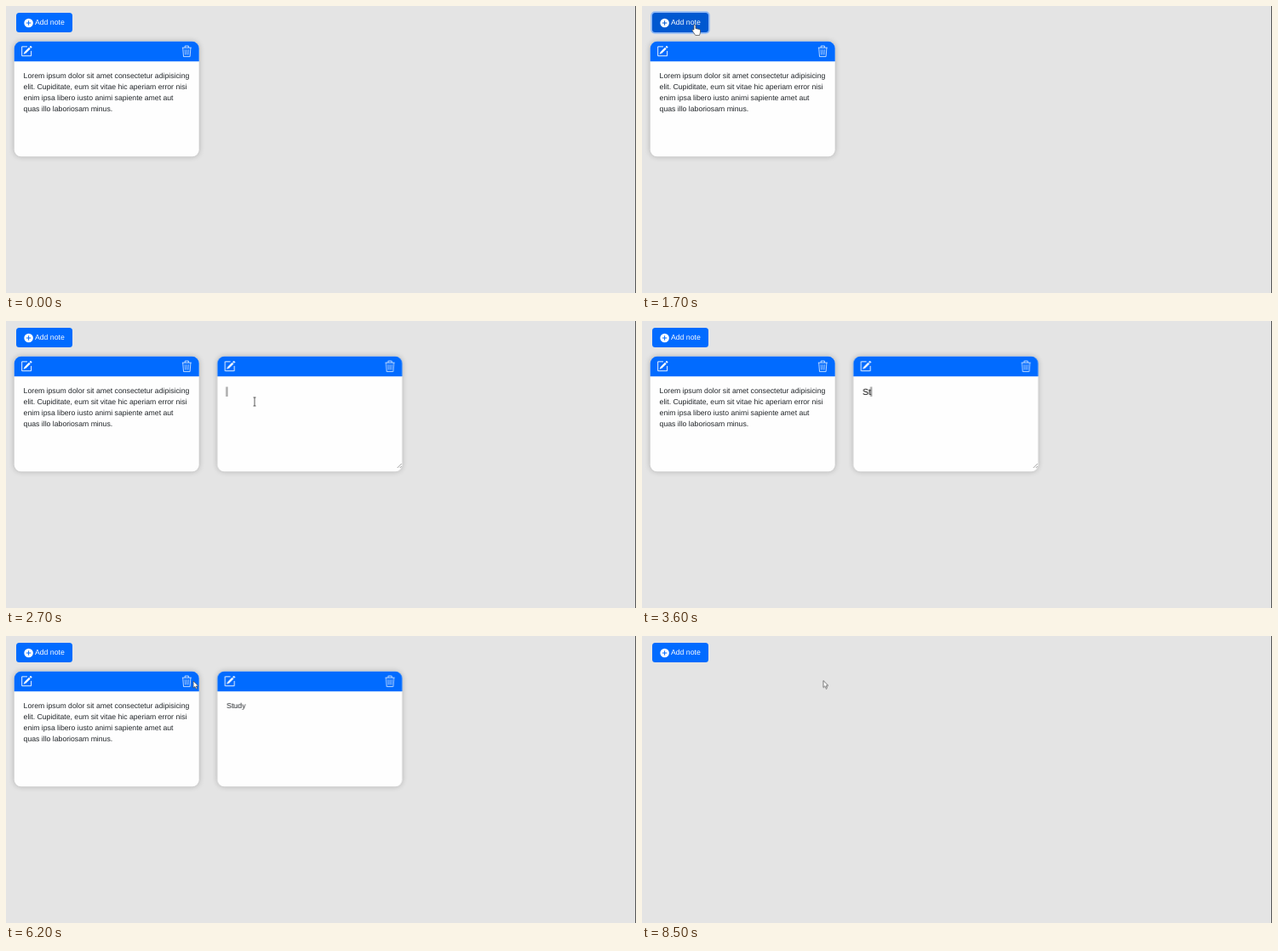
An HTML page for the animation above (9.1 s loop, 740 by 338 pixels).

```html
<!DOCTYPE html>
<html lang="en">
<head>
<meta charset="utf-8">
<title>Notes</title>
<style>
  html, body { margin: 0; width: 100%; height: 100%; overflow: hidden; background: #e4e4e4; }
  svg { display: block; }
  text { font: 8.68px "Liberation Sans", Arial, sans-serif; fill: #212529; text-rendering: geometricPrecision; }
  #label { fill: #fff; }
  #typed { font-size: 10.4px; fill: #000; }
  .icon { fill: none; stroke: #fff; stroke-linejoin: round; }
  .shadow { filter: drop-shadow(0 0 3px rgba(0, 0, 0, .24)); }
  .pointer { fill: #fff; stroke: #444; stroke-width: .7; stroke-linejoin: round; }
</style>
</head>
<body>
<svg width="740" height="338" viewBox="0 0 740 338">
  <defs>
    <g id="card">
      <rect class="shadow" x="9.7" y="41.8" width="217" height="135.5" rx="8" fill="#fefefe"/>
      <path d="M9.7 65.2V49.8a8 8 0 0 1 8-8h201a8 8 0 0 1 8 8v15.4z" fill="#016bff"/>
      <g class="icon" transform="translate(17.4 46.6) scale(.84)">
        <path d="M9 1.5H1.5v13h13v-7" stroke-width="1.1"/>
        <path d="M5.7 10.3L12.4 3.6M13.1 2.9L14.8 1.2" stroke-width="2.8"/>
        <path d="M3.8 12.2l1-2.8 1.8 1.8z" fill="#fff" stroke="none"/>
      </g>
      <g class="icon" transform="translate(205.6 46.6) scale(.84)" opacity=".88">
        <path d="M1.5 3h13M5.5 3V.5h5V3M2.5 3l1 12.5h9L13.5 3"/>
        <path d="M5.5 5.5l.4 7.5M8 5.5V13M10.5 5.5l-.4 7.5" stroke-width=".8"/>
      </g>
    </g>
  </defs>

  <rect width="740" height="338" fill="#e4e4e4"/>
  <rect x="739" width="1" height="338" fill="#555"/>

  <rect id="ring" x="10.2" y="6.2" width="69.6" height="26.6" rx="5" fill="#8fb8f4"/>
  <rect id="button" x="12" y="8" width="66" height="23" rx="3.5" fill="#016bff"/>
  <circle cx="26.6" cy="20" r="5.3" fill="#fff"/>
  <path id="plus" d="M23.9 20h5.4M26.6 17.3v5.4" stroke="#016bff"/>
  <text id="label" x="34" y="22.4">Add note</text>

  <g id="first">
    <use href="#card"/>
    <text y="72.3">
      <tspan x="20.6" dy="13">Lorem ipsum dolor sit amet consectetur adipisicing</tspan>
      <tspan x="20.6" dy="13">elit. Cupiditate, eum sit vitae hic aperiam error nisi</tspan>
      <tspan x="20.6" dy="13">enim ipsa libero iusto animi sapiente amet aut</tspan>
      <tspan x="20.6" dy="13">quas illo laboriosam minus.</tspan>
    </text>
  </g>

  <g id="second">
    <use href="#card"/>
    <g id="editor">
      <path d="M221 173l5-5M224 173l2-2" stroke="#777" stroke-width=".7"/>
      <text id="typed" x="20.6" y="87"></text>
      <rect id="caret" x="-.3" y="77.5" width=".8" height="11.5"/>
    </g>
    <text id="saved" x="20.6" y="85.3">Study</text>
  </g>

  <g id="cursor">
    <path id="arrow" class="pointer" d="M0 0v8.2l1.9-1.7 1.3 2.8 1.3-.6-1.2-2.7h2.5z"/>
    <path id="hand" class="pointer" d="M-1 6V1a1 1 0 0 1 2 0v3.5l4.5 1q1 .3 1 1.5v2l-1 3.5H.8L-3 7q0-2 2-1z"/>
    <path id="beam" d="M-1.5-5h3M0-5V5M-1.5 5h3" stroke="#333" stroke-width=".8"/>
  </g>
</svg>
<script>
const LOOP = 9100, TICK = 100;
const $ = id => document.getElementById(id);
const move = (x, y) => `translate(${x}px, ${y}px)`;
const easeOut = k => 1 - (1 - k) ** 2;

// Holds each value until the next step: [time, value]
function play(el, prop, steps) {
  const frames = steps.map(([t, v]) => ({ offset: t / LOOP, [prop]: v, easing: 'step-end' }));
  frames.push({ offset: 1, [prop]: steps.at(-1)[1] });
  el.animate(frames, { duration: LOOP, iterations: Infinity });
}

// Visible only in the given [from, to] spans
function show(el, spans, prop = 'opacity') {
  const steps = spans[0][0] > 0 ? [[0, 0]] : [];
  for (const [from, to] of spans) {
    steps.push([from, 1]);
    if (to < LOOP) steps.push([to, 0]);
  }
  play(el, prop, steps);
}

// Button
const hover = [[0, '#016bff'], [1200, '#0058d0'], [2300, '#016bff']];
play($('button'), 'fill', hover);
play($('plus'), 'stroke', hover);
show($('ring'), [[1700, 2700]]);

// Notes
show($('first'), [[0, 6800]]);
show($('second'), [[1900, 8500]]);
play($('second'), 'transform', [[0, move(238.6, 0)], [6800, move(0, 0)]]);
show($('editor'), [[1900, 5400]]);
show($('saved'), [[5400, 8500]]);

// Typing
const typed = $('typed');
const caretSteps = [[0, move(20.6, 0)]];
const keyTime = i => 3400 + TICK * Math.ceil(1.5 * i);
[...'Study'].forEach((letter, i) => {
  const span = document.createElementNS(typed.namespaceURI, 'tspan');
  span.textContent = letter;
  typed.append(span);
  show(span, [[keyTime(i), LOOP]], 'fillOpacity');
  caretSteps.push([keyTime(i), move(typed.getEndPositionOfChar(i).x, 0)]);
});
play($('caret'), 'transform', caretSteps);
show($('caret'), [[2700, 3300], [3400, 4500], [5000, 5200]]);

// Cursor glides from stop to stop, one position per tick
let pos = [593, 171];
const track = [[0, move(...pos)]];
function glide(start, end, x, y) {
  const [x0, y0] = pos;
  for (let t = start; t <= end; t += TICK) {
    const k = easeOut((t - start + TICK) / (end - start + TICK));
    track.push([t, move(x0 + (x - x0) * k, y0 + (y - y0) * k)]);
  }
  pos = [x, y];
}
glide(100, 500, 124, 23);
glide(700, 900, 105.5, 19);
glide(1100, 1300, 62, 22);
glide(2300, 2400, 292, 95);
glide(4700, 5000, 257, 55);
glide(6000, 6400, 213, 52.5);
play($('cursor'), 'transform', track);
show($('arrow'), [[100, 1200], [2300, 2400], [6000, 6300], [8500, LOOP]]);
show($('hand'), [[1200, 2300], [4900, 6000], [6300, 8500]]);
show($('beam'), [[2400, 3400], [4700, 4900]]);
</script>
</body>
</html>
```
